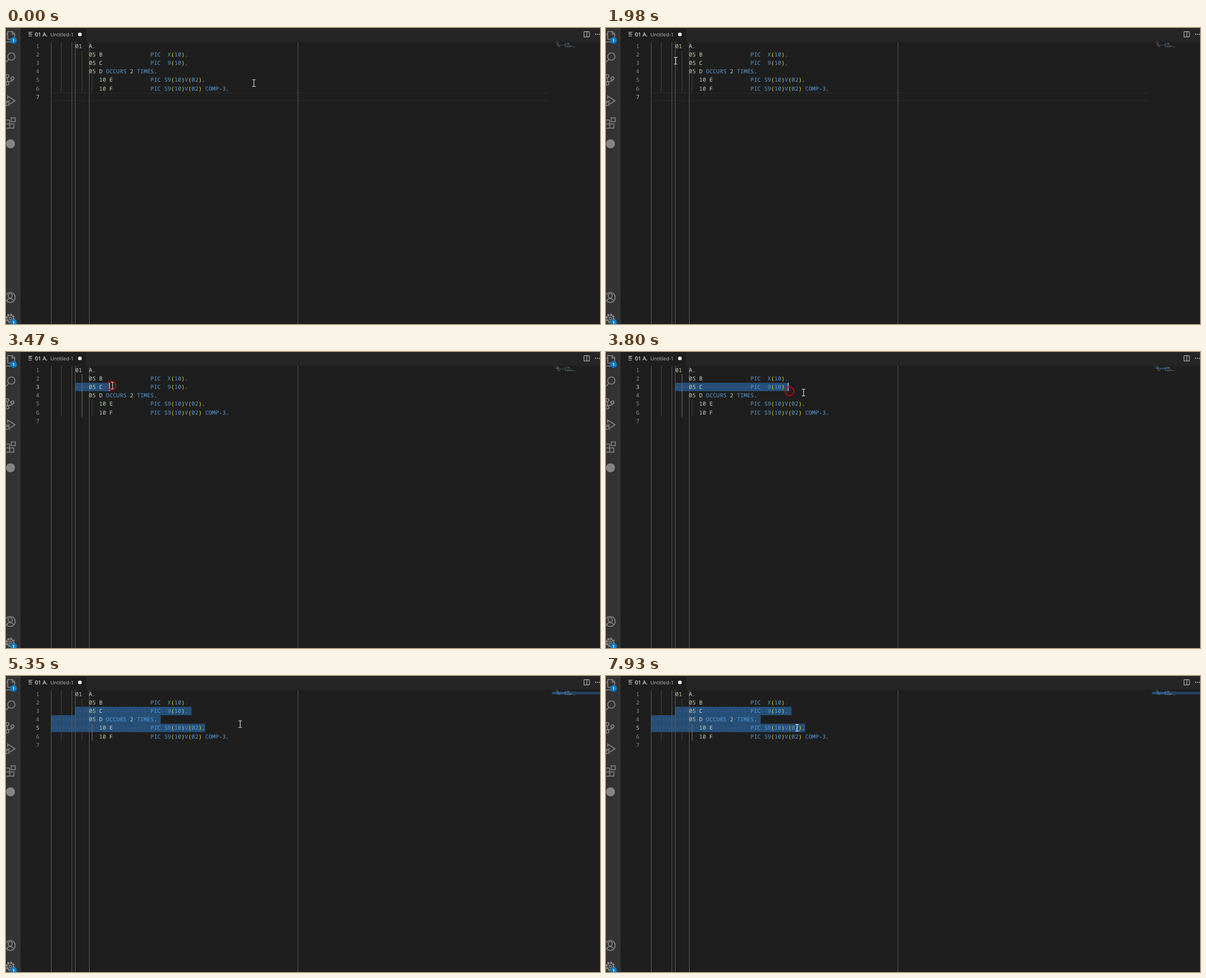
Write an HTML page that moves like this. It is 1059 by 529 pixels and loops after 8 s.

```html
<!DOCTYPE html>
<html lang="en">
<head>
<meta charset="utf-8">
<title>Editor selection</title>
<style>
  html, body { margin: 0; width: 100%; height: 100%; overflow: hidden; background: #1e1e1e; }
  svg { display: block; width: 1059px; height: 529px; }
  text { white-space: pre; text-rendering: geometricPrecision; }
  .code text { font: 10.17px "Noto Sans Mono", monospace; }
  .ui text { font-family: "Noto Sans", "Open Sans", sans-serif; }
  .icons { fill: none; stroke: #858585; stroke-width: 1.6; }
</style>
</head>
<body>
<svg viewBox="0 0 1059 529" xmlns="http://www.w3.org/2000/svg">
  <rect width="1059" height="529" fill="#1e1e1e"/>
  <g id="lineBox" fill="none" stroke="#2b2b2b"><path d="M81 .7H967M81 14.4H967"/></g>
  <g id="selection"></g>
  <g id="guides" stroke="#404040"></g>
  <g id="rulers" stroke="#5a5a5a"></g>
  <g class="code" id="code"></g>
  <g id="minimap"></g>
  <rect id="caret" width="1.4" height="15" fill="#c8c8c6"/>

  <g class="ui">
    <rect x="26" width="1033" height="24.5" fill="#252526"/>
    <rect x="26" width="117" height="24.5" fill="#1e1e1e"/>
    <path d="M40 7.5h7M40 9.5h5M40 11.5h7M40 14.5h6" stroke="#c5c5c5"/>
    <text x="51.5" y="15" font-size="9.8" fill="#fff">01 A.</text>
    <text x="79" y="15" font-size="8.95" fill="#b4b4b4">Untitled-1</text>
    <circle cx="131.7" cy="11.4" r="3.2" fill="#fff"/>
    <path d="M1030.5 6.5h9.5v9.5h-9.5zM1035.5 6.5v9.5" fill="none" stroke="#c5c5c5"/>
    <g fill="#c5c5c5"><circle cx="1051.2" cy="11.3" r="1"/><circle cx="1054.8" cy="11.3" r="1"/><circle cx="1058.4" cy="11.3" r="1"/></g>

    <rect width="26" height="529" fill="#333"/>
    <g class="icons">
      <path d="M3 20V6.500h8.500l4 4V20zM11 6.500v4.500h4.500M3 11H-1V25H10"/>
      <circle cx="9.5" cy="51" r="6.500"/><path d="M5 56L-1 62.500"/>
      <circle cx="2.500" cy="86" r="2.800"/><circle cx="2.500" cy="99" r="2.800"/><circle cx="11.500" cy="90" r="2.800"/>
      <path d="M2.500 89V96M11.500 93C11 96 6 95 3 96"/>
      <path d="M3 127V121.500L16 130L7 136"/>
      <ellipse cx="2.500" cy="134.500" rx="3" ry="4"/><path d="M-1 133H6M5 131l2-2M5 137l2 2"/>
      <path d="M-1 164.500H6.500V179H-1M-1 171.500H14V179H6M9.500 160.500H16.500V167.500H9.500z"/>
      <circle cx="7.500" cy="481.500" r="9"/><circle cx="7.500" cy="478.500" r="3.800"/>
      <path d="M1.500 488C2.500 482 12.500 482 13.500 488"/>
      <circle cx="7.500" cy="519" r="7" stroke-width="3" stroke-dasharray="3.400 2.100"/>
      <circle cx="7.500" cy="519" r="5.500"/><circle cx="7.500" cy="519" r="2.200"/>
    </g>
    <circle cx="8" cy="207" r="8" fill="#858585"/>
    <g fill="#007acc"><circle cx="13.500" cy="22.300" r="6"/><circle cx="13.500" cy="526" r="6"/></g>
    <g fill="#fff" font-size="7.500" font-weight="600" text-anchor="middle">
      <text x="13.500" y="25">1</text><text x="13.500" y="528.700">1</text>
    </g>
  </g>

  <path id="pointer" d="M-3 -6H-.8L0 -5.500L.8 -6H3M0 -6V6M-3 6H-.8L0 5.500L.8 6H3" fill="none" stroke="#e4e4e4" stroke-width="1.100"/>
  <circle id="ring" r="7.800" fill="none" stroke="#d0040c" stroke-width="1.700"/>
</svg>
<script>
const LOOP = 8000, LEFT = 80.7, TOP = 24.8, CHAR = 6.1, ROW = 15.1;
const MAP_X = 973.3, MAP_CHAR = 0.79, MAP_ROW = 1.6;
const BLUE = '#569cd6', GREEN = '#b5cea8', PLAIN = '#d4d4d4', GOLD = '#ffd700';

const lines = [
  '       01  A.',
  '           05 B              PIC  X(10).',
  '           05 C              PIC  9(10).',
  '           05 D OCCURS 2 TIMES.',
  '              10 E           PIC S9(10)V(02).',
  '              10 F           PIC S9(10)V(02) COMP-3.'
];

// Each track holds its value from the given time on.
const pointerTrack = [
  [0, 442, 98.5], [130, 440, 99], [260, 436, 102], [390, 431, 104], [520, 427.5, 105.5],
  [1060, 426, 105], [1190, 378, 97], [1320, 280, 80], [1450, 190, 65], [1580, 144.5, 58.5],
  [1980, 124.3, 58.5], [3340, 126, 58.5], [3470, 190, 60], [3630, 266, 65], [3800, 352.3, 72.5],
  [3950, 395, 78], [4070, 419, 84], [4350, 419, 85.3], [4490, 418.5, 85.8], [5350, 417.5, 86],
  [5500, 412, 86], [5630, 397.5, 86], [5770, 356.5, 86], [5910, 350, 88], [6040, 344, 91], [6160, 340.7, 92.5]
];
const ringTrack = [
  [0], [3210, 124, 59], [3340, 125, 59], [3470, 188, 60], [3630, 246, 63], [3800, 327.3, 70],
  [3950, 385, 77], [4070, 418, 84], [4350, 418.7, 85.2], [4490, 419, 87], [5050]
];
// time, active line, column of the selection end
const selTrack = [[0, 7, 0], [3210, 3, 7], [3470, 3, 17], [3630, 3, 27], [3800, 3, 40], [3950, 4, 31], [4490, 5, 45]];
const caretTrack = [
  [0, 0], [3210, 1], [4350, 0], [4490, 1], [4910, 0], [5500, 1],
  [5910, 0], [6430, 1], [6980, 0], [7370, 1], [7930, 0]
];

const $ = id => document.getElementById(id);
const colX = c => LEFT + c * CHAR;
const rowY = n => TOP + (n - 1) * ROW;
const at = (track, t) => track.reduce((hit, k) => k[0] <= t ? k : hit);
const rect = (x, y, w, h, fill, more = '') =>
  `<rect x="${x}" y="${y}" width="${w}" height="${h}" fill="${fill}" ${more}/>`;
const vline = (x, y1, y2, more = '') => `<path d="M${x} ${y1}V${y2}" ${more}/>`;

function colour(word, col, n) {
  if (/[()]/.test(word)) return GOLD;
  if (word === '.') return n === 2 || n === 3 ? BLUE : PLAIN;
  if (/^\d+$/.test(word) && col < 28) return GREEN;
  return /^[A-F]$/.test(word) && col < 20 ? PLAIN : BLUE;
}

let codeMarkup = '', mapMarkup = '';
lines.forEach((line, i) => {
  const n = i + 1;
  for (const m of line.matchAll(/[()]|\.|[\w-]+/g)) {
    const fill = colour(m[0], m.index, n);
    codeMarkup += `<text x="${colX(m.index)}" y="${rowY(n) + 11.2}" fill="${fill}">${m[0]}</text>`;
    mapMarkup += rect(MAP_X + m.index * MAP_CHAR, TOP + i * MAP_ROW + .2, m[0].length * MAP_CHAR, 1, fill, 'opacity=".5"');
  }
});
for (let n = 1; n <= 7; n++)
  codeMarkup += `<text class="num" x="59.6" y="${rowY(n) + 11.2}" text-anchor="end">${n}</text>`;
$('code').innerHTML = codeMarkup;
$('rulers').innerHTML = [80.5, 117.5, 123.5, 148.5, 520.5].map(x => vline(x, 24.5, 529)).join('');
const numbers = document.querySelectorAll('.num');

function selected(line, end) {
  const spans = [];
  if (line > 5 || (line === 3 && end === 7)) return spans;
  for (let n = 3; n <= line; n++)
    spans.push({ n, from: n === 3 ? 7 : 0, to: n === line ? end : lines[n - 1].length + 1 });
  return spans;
}

function drawSelection(line, end) {
  const spans = selected(line, end);
  let boxes = '', dots = '', map = '';
  for (const { n, from, to } of spans) {
    boxes += rect(colX(from), rowY(n), (to - from) * CHAR, ROW, '#264f78', 'rx="1.5"');
    for (let c = from; c < to; c++)
      if (lines[n - 1][c] === ' ') dots += rect(colX(c) + 2.5, rowY(n) + 7.2, 1.1, 1.1, '#587796');
    const y = TOP + 3.2 + (n - 3) * MAP_ROW;
    if (spans.length > 1) map += rect(MAP_X, y, 1059 - MAP_X, MAP_ROW, '#264f78', 'opacity=".8"');
    map += rect(MAP_X + from * MAP_CHAR, y, (to - from) * MAP_CHAR, MAP_ROW, '#264f78');
  }
  $('selection').innerHTML = boxes + dots;
  $('minimap').innerHTML = map + mapMarkup;
  $('lineBox').style.display = spans.length ? 'none' : '';
  $('lineBox').setAttribute('transform', `translate(0 ${rowY(line)})`);

  const lit = on => on ? 'stroke="#707070"' : '';
  $('guides').innerHTML = vline(98.5, rowY(1), rowY(7)) +
    vline(135.5, rowY(2), rowY(7), lit(line === 3)) +
    vline(153.5, rowY(5), rowY(7), lit(line === 4 || line === 5));
  numbers.forEach((el, i) => el.setAttribute('fill', i + 1 === line ? '#c6c6c6' : '#858585'));
}

let shown = null;
function render(t) {
  const sel = at(selTrack, t);
  if (sel !== shown) {
    drawSelection(sel[1], sel[2]);
    shown = sel;
  }
  const [, px, py] = at(pointerTrack, t);
  $('pointer').setAttribute('transform', `translate(${px} ${py})`);

  const [, rx, ry] = at(ringTrack, t);
  $('ring').style.display = rx ? '' : 'none';
  if (rx) $('ring').setAttribute('transform', `translate(${rx} ${ry})`);

  $('caret').style.display = at(caretTrack, t)[1] ? '' : 'none';
  $('caret').setAttribute('x', colX(sel[2]) - .5);
  $('caret').setAttribute('y', rowY(sel[1]));
}

const start = performance.now();
function tick() {
  render((performance.now() - start) % LOOP);
  requestAnimationFrame(tick);
}
tick();
</script>
</body>
</html>
```
